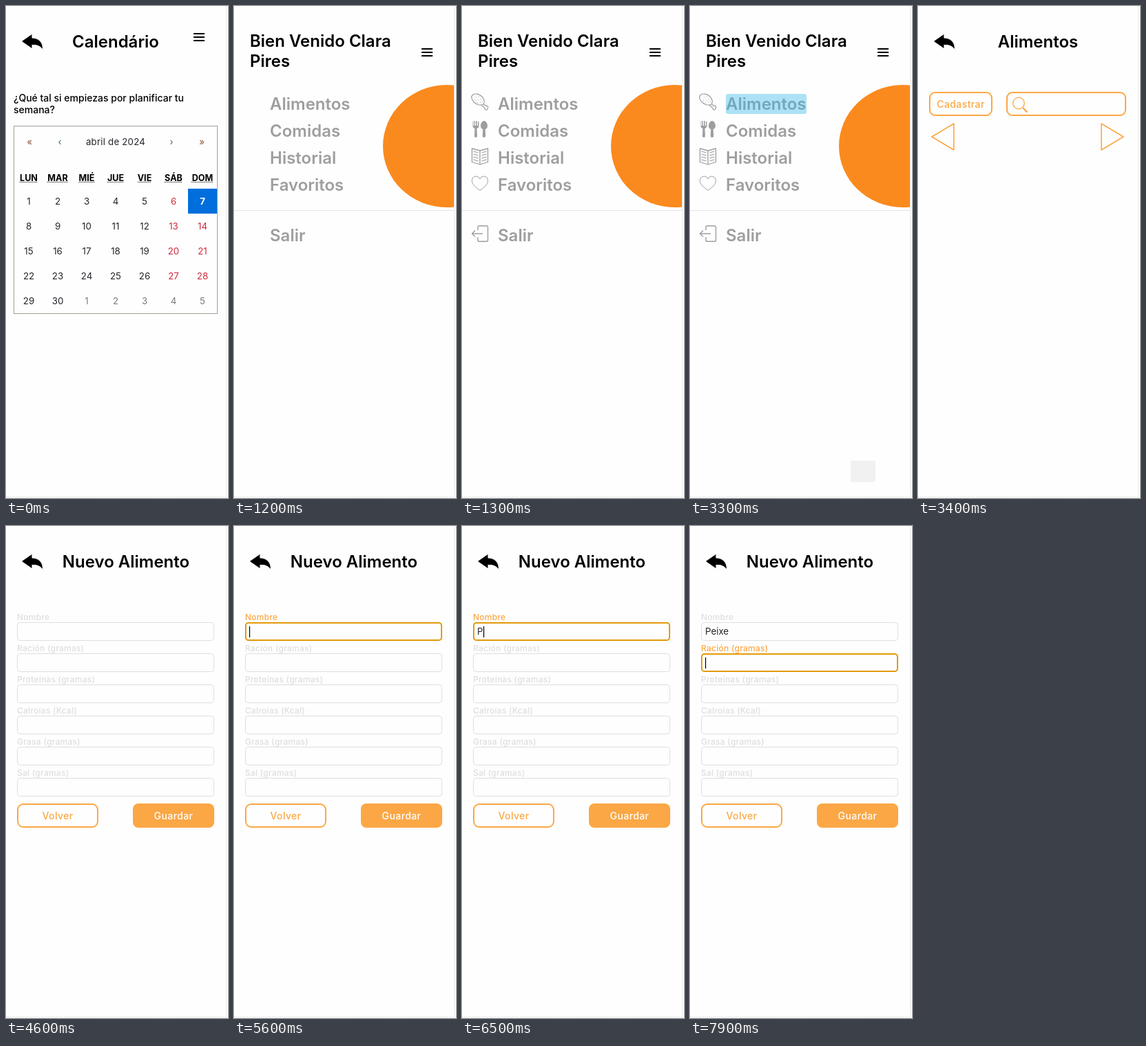
These frames come from a looping animation (322x711 px, 8 s). An HTML page:

```html
<!DOCTYPE html>
<html lang="es">
<head>
<meta charset="utf-8">
<title>Planificador de comidas</title>
<style>
  html, body { margin: 0; width: 100%; height: 100%; overflow: hidden; background: #fefefe; }
  svg { display: block; width: 100%; height: 100%; font-family: Inter, "Open Sans", sans-serif; }
  text { white-space: pre; }
  .title { font-size: 24px; font-weight: 600; }
  .item { font-size: 24px; font-weight: 600; fill: #9e9e9e; }
  .intro { font-size: 14px; font-weight: 500; }
  .day { font-size: 13.3px; fill: #25252b; }
  .week { font-size: 12.6px; font-weight: 700; }
  .label { font-size: 12px; font-weight: 500; letter-spacing: .25px; }
  .button { font-size: 14px; font-weight: 500; letter-spacing: .4px; }
  .value { font-size: 13.3px; fill: #212529; }
  .mid { text-anchor: middle; }
  .tap { fill: rgba(51, 181, 229, .4); }
</style>
</head>
<body>
<svg id="stage" viewBox="0 0 322 711"></svg>
<script>
const LOOP = 8000;
const ORANGE = '#fba745', GREY = '#dedede', FOCUS = '#e39a0c';
const stage = document.getElementById('stage');
const $ = id => document.getElementById(id);

const text = (x, y, cls, str, extra = '') =>
  `<text x="${x}" y="${y}" class="${cls}" ${extra}>${str}</text>`;
const rect = (x, y, w, h, extra) =>
  `<rect x="${x}" y="${y}" width="${w}" height="${h}" ${extra}/>`;
const path = (d, extra = '') => `<path d="${d}" ${extra}/>`;
const outline = (x, y, w, h) =>
  rect(x + 1, y + 1, w - 2, h - 2, `rx="8" fill="none" stroke="${ORANGE}" stroke-width="2"`);
const scene = (id, body) => `<g id="${id}">${body}</g>`;
const burger = y => [0, 5, 10].map(d => rect(272, y + d, 16, 2, '')).join('');
const back = path('M23 51L37.5 41V46.5C47 46.5 53 52 53 62C49 57 45 55.5 37.5 56V61Z');
const header = (x, str) => back + text(x, 60, 'title mid', str);
const toast = (id, h) => rect(233, 657, 36, h, `id="${id}" rx="2" fill="#f1f1f1"`);

function calendar() {
  const col = i => 33 + 42 * i;
  const names = ['LUN', 'MAR', 'MIÉ', 'JUE', 'VIE', 'SÁB', 'DOM'];
  const widths = [26, 30, 23, 24, 20, 26, 32];
  let s = header(159, 'Calendário') + burger(39) +
    text(11, 138, 'intro', '¿Qué tal si empiezas por planificar tu') +
    text(11, 155, 'intro', 'semana?') +
    rect(11.5, 173.5, 295, 271, 'fill="none" stroke="#a0a096"') +
    text(34, 201, 'day mid', '«', 'style="fill:#8a5538"') +
    text(78, 201, 'day mid', '‹', 'style="fill:#46687c"') +
    text(159, 201, 'day mid', 'abril de 2024', 'letter-spacing=".2"') +
    text(240, 201, 'day mid', '›', 'style="fill:#46687c"') +
    text(284, 201, 'day mid', '»', 'style="fill:#8a5538"') +
    rect(264, 264, 42, 36, 'fill="#006edc"');
  names.forEach((name, i) => {
    const half = widths[i] / 2;
    s += text(col(i), 253, 'week mid', name) +
      path(`M${col(i) - half} 254.5h${widths[i]}`, 'stroke="#000" stroke-dasharray="1 1"');
  });
  for (let i = 0; i < 35; i++) {
    const c = i % 7, y = 287 + 36 * Math.floor(i / 7);
    const color = i === 6 ? '#fff;font-weight:700' : i > 29 ? '#7b7b7b' : c > 4 ? '#d02a3c' : '#25252b';
    s += text(col(c), y, 'day mid', i % 30 + 1, `style="fill:${color}"`);
  }
  return s;
}

function menuIcons() {
  const crumbs = [[20, 132], [24, 131], [19, 136], [23, 136], [27, 135], [22, 140], [26, 139], [29, 138]]
    .map(([x, y]) => `M${x} ${y}h1`).join('');
  const bookLines = [210, 214, 218, 222]
    .map(y => `M16.5 ${y}l7 2M28.5 ${y + 2}l7 -2`).join('');
  const line = 'fill="none" stroke="#9e9e9e" stroke-linejoin="round" stroke-width=';
  return path('M15 129C18 125.500 25 127 29 131C33 135 33 139 31 142C27 144 21 143 17.500 139C14 135 13 131 15 129Z' +
      'M31 141L34.500 144.500C37 143.500 39 146 37 148C37 150.500 33.500 151.500 33 147.500L28 143', line + '"1.2"') +
    path(crumbs, line + '"1"') +
    path('M15.500 167v6q0 3 3 4l-.5 11q0 2 2 2t2 -2l-.5 -11q3 -1 3 -4v-6h-1.500v6h-1.300v-7h-1.700v7h-1.500v-7h-1.500v7h-1v-6Z',
      'fill="#9e9e9e"') +
    path('M32 166C35 166 37 170 37 173C37 176 35.500 177.500 33.700 178L34.300 188Q34 190 32 190T29.700 188L30.300 178' +
      'C28.500 177.500 27 176 27 173C27 170 29 166 32 166Z', 'fill="#9e9e9e"') +
    path('M14.500 206L26 209L37.500 206V225.500L26 229L14.500 225.500ZM26 209V229', line + '"1.3"') +
    path(bookLines, line + '"1.2"') +
    path('M26 266.500C20 262 14.500 258 14.500 252.500C14.500 245 23.500 244 26 250' +
      'C28.500 244 37.500 245 37.500 252.500C37.500 258 32 262 26 266.500Z', line + '"1"') +
    path('M23 324V319.500Q23 317.700 25 317.700H36Q37.500 317.700 37.500 319.500V338.500Q37.500 340.300 36 340.300H25' +
      'Q23 340.300 23 338.500V334M30 329H15M19 324.500L14.500 329L19 333.500', line + '"1.4"');
}

function menu() {
  const items = [['Alimentos', 150], ['Comidas', 189], ['Historial', 228], ['Favoritos', 267], ['Salir', 340]];
  return text(23, 59, 'title', 'Bien Venido Clara') + text(23, 88, 'title', 'Pires') + burger(61) +
    '<ellipse cx="308.5" cy="202.5" rx="92.5" ry="88.5" fill="#fb8a1e" clip-path="url(#screen)"/>' +
    path('M0 295.5H319', 'stroke="#e6e6e6"') +
    items.map(([str, y]) => text(52, y, 'item', str)).join('') +
    scene('icons', menuIcons()) +
    scene('menuTap', rect(52, 127, 117, 29, 'rx="3" class="tap"') + toast('menuToast', 31));
}

function foods() {
  const thin = `fill="none" stroke="${ORANGE}" stroke-width="1.6" stroke-linejoin="round"`;
  return header(174, 'Alimentos') + outline(16, 124, 92, 35) + outline(128, 124, 174, 35) +
    text(62, 147, 'button mid', 'Cadastrar', `fill="${ORANGE}"`) +
    `<circle cx="146" cy="140.5" r="8.3" fill="none" stroke="${ORANGE}" stroke-width="1.3"/>` +
    path('M152 147L158.500 153.500', `stroke="${ORANGE}" stroke-width="2.4"`) +
    path('M20 189L52 170V208ZM298 189L266 170V208Z', thin) +
    scene('addTap', rect(16, 124, 92, 35, 'rx="8" class="tap"') + toast('addToast', 33));
}

function form() {
  const names = ['Nombre', 'Ración (gramas)', 'Proteínas (gramas)', 'Calroias (Kcal)', 'Grasa (gramas)', 'Sal (gramas)'];
  return header(174, 'Nuevo Alimento') +
    names.map((name, i) =>
      text(16, 136 + 45 * i, 'label', name, `id="label${i}" fill="${GREY}"`) +
      rect(16.5, 139.5 + 45 * i, 285, 26, `rx="4" fill="none" stroke="${GREY}"`)).join('') +
    rect(17, 0, 284, 25, `id="focus" rx="4" fill="none" stroke="${FOCUS}" stroke-width="2"`) +
    text(22, 157, 'value', '', 'id="value"') +
    rect(22, 0, 1.2, 16, 'id="caret"') +
    outline(16, 401, 118, 35) + text(75, 424, 'button mid', 'Volver', `fill="${ORANGE}"`) +
    rect(184, 401, 118, 35, `rx="8" fill="${ORANGE}"`) +
    text(243, 424, 'button mid', 'Guardar', 'fill="#fff"');
}

stage.innerHTML = '<clipPath id="screen"><rect width="319" height="711"/></clipPath>' +
  rect(0, 0, 322, 711, 'fill="#fefefe"') +
  path('M319.5 0V711', 'stroke="#e9e9e9"') +
  path('M0 709.5H319', 'stroke="#e2e2e2" stroke-dasharray="2 1"') +
  scene('calendar', calendar()) + scene('menu', menu()) +
  scene('foods', foods()) + scene('form', form());

const show = (id, on) => $(id).style.display = on ? '' : 'none';
const between = (t, a, b) => t >= a && t < b;

function typed(t) {
  if (t < 6500) return '';
  return ['P', 'Pe', 'Peix', 'Peixe'][Math.min(3, Math.floor((t - 6500) / 100))];
}

function render(t) {
  show('calendar', t < 1200);
  show('menu', between(t, 1200, 3400));
  show('icons', t >= 1300);
  show('menuTap', t >= 3300);
  show('foods', between(t, 3400, 4600));
  show('addTap', t >= 4500);
  show('form', t >= 4600);

  const active = t < 5600 ? -1 : t < 7000 ? 0 : 1;
  for (const i of [0, 1]) $('label' + i).setAttribute('fill', i === active ? ORANGE : GREY);
  show('focus', active >= 0);
  $('focus').setAttribute('y', 140 + 45 * active);

  const value = $('value');
  value.textContent = typed(t);
  const end = active === 0 && t >= 6500 ? value.getComputedTextLength() + .5 : 0;
  $('caret').setAttribute('x', 22 + end);
  $('caret').setAttribute('y', 145 + 45 * active);
  show('caret', active >= 0 && !between(t, 6000, 6500) && !between(t, 7500, 7900));
}

function tick() {
  render(performance.now() % LOOP);
  requestAnimationFrame(tick);
}
tick();
</script>
</body>
</html>
```
